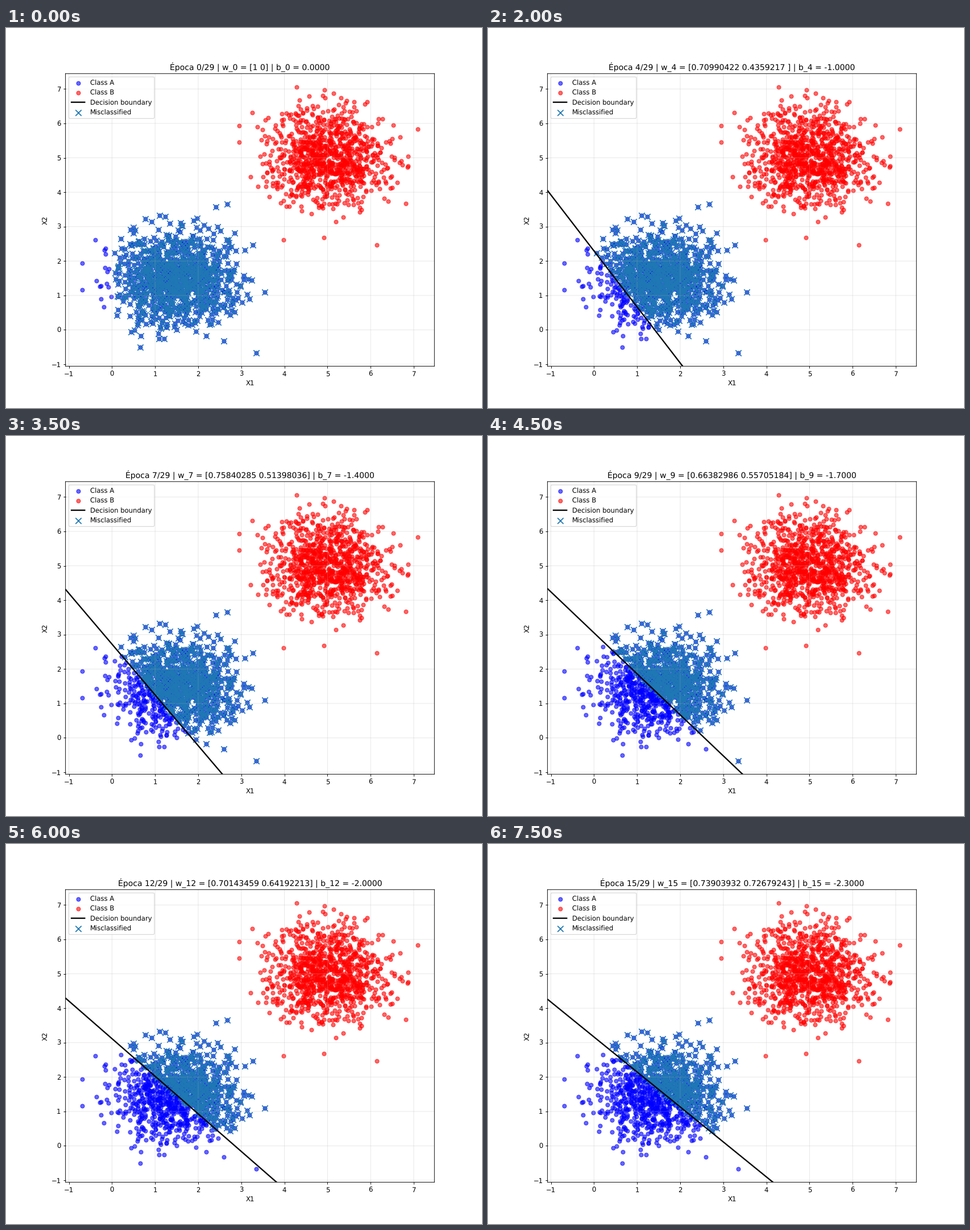
Write a matplotlib script that moves like this. It is 837 by 669 pixels and loops after 8000 ms.

```python
import matplotlib.pyplot as plt
import numpy as np
from matplotlib.animation import FuncAnimation

DPI = 83.7
N = 1000            # points per class
SPREAD = 0.7
CORE = 1.9          # radius of the random core around each centre
EPOCHS = 16
LAST_EPOCH = 29

# Isolated points that set the outline of each cloud
EDGE_A = [(-.69, 1.94), (-.69, 1.17), (-.39, 2.62), (.66, -.51), (2.59, -.32),
          (3.35, -.67), (3.55, 1.1), (3.27, 2.47), (2.67, 3.66), (2.41, 3.58)]
EDGE_B = [(4.28, 7.06), (4.93, 6.98), (3.26, 6.32), (2.95, 5.93), (2.95, 5.45),
          (3.98, 2.62), (4.92, 2.68), (6.14, 2.47), (6.82, 3.67), (7.09, 5.84)]

# Training states: epoch, w1, w2, bias
KEYS = np.array([
    (0, 1, 0, 0),
    (4, .70990422, .4359217, -1.0),
    (7, .75840285, .51398036, -1.4),
    (9, .66382986, .55705184, -1.7),
    (11, .68872326, .70218711, -1.9),
    (13, .71414592, .58165716, -2.1),
    (15, .73903932, .72679243, -2.3),
]).T


def cloud(rng, centre, edge):
    noise = rng.normal(0, SPREAD, (N, 2))
    core = noise[np.hypot(*noise.T) < CORE]
    return np.vstack([centre + core, edge])


def state(epoch):
    """Weights and bias after the given epoch."""
    w1, w2, b = (np.interp(epoch, KEYS[0], row) for row in KEYS[1:])
    w = np.array([w1, w2]) if epoch else np.array([1, 0])
    return w, round(b, 1)


# Soft text and lines at fractional pixel positions
plt.rcParams.update({"text.hinting": "none", "path.snap": False})

rng = np.random.default_rng(0)
class_a = cloud(rng, 1.5, EDGE_A)
class_b = cloud(rng, 5.0, EDGE_B)

fig, ax = plt.subplots(figsize=(837.01 / DPI, 669.01 / DPI), dpi=DPI)
ax.scatter(*class_a.T, color="blue", alpha=0.6, label="Class A")
ax.scatter(*class_b.T, color="red", alpha=0.6, label="Class B")
boundary, = ax.plot([], [], "k-", lw=2, label="Decision boundary")
missed = ax.scatter([], [], s=80, marker="x", color="C0", label="Misclassified")
ax.set(xlim=(-1.078, 7.479), ylim=(-1.056, 7.447), xlabel="X1", ylabel="X2")
ax.grid(True, alpha=0.3)
ax.legend(loc="upper left")


def update(epoch):
    w, b = state(epoch)
    if w[1]:
        x = np.array(ax.get_xlim())
        boundary.set_data(x, -(w[0] * x + b) / w[1])
    else:
        boundary.set_data([], [])
    missed.set_offsets(class_a[class_a @ w + b > 0])
    ax.set_title(f"Época {epoch}/{LAST_EPOCH} | w_{epoch} = {w} | b_{epoch} = {b:.4f}")
    return boundary, missed


anim = FuncAnimation(fig, update, frames=EPOCHS, interval=500, repeat=True)
plt.show()
```
